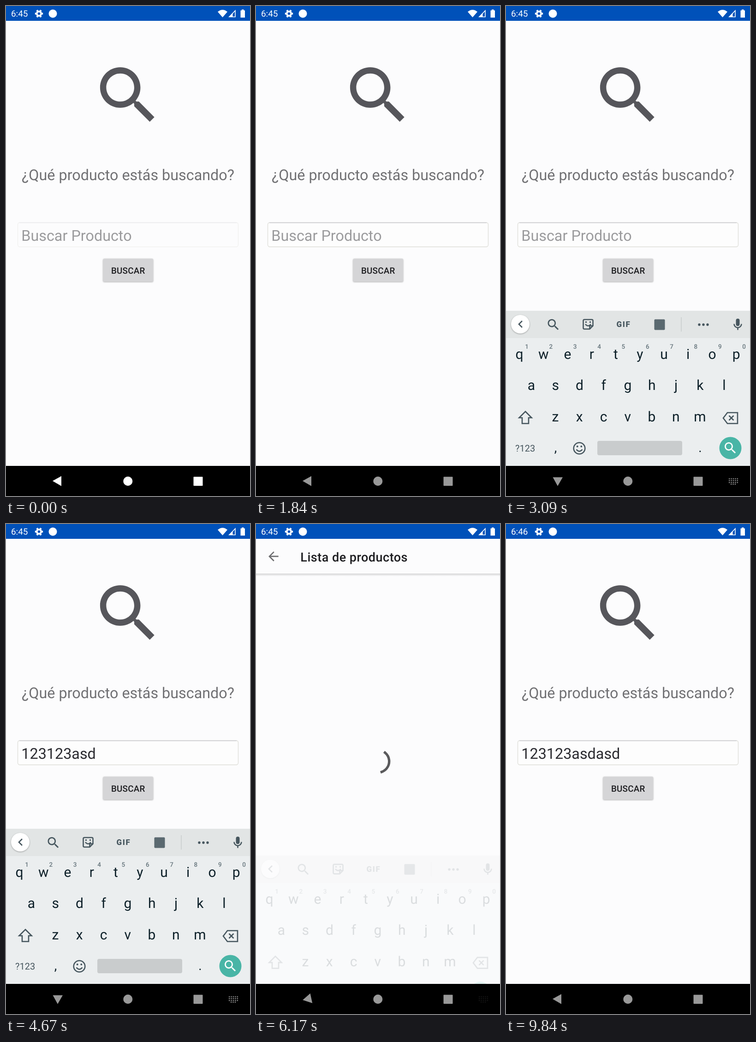
These frames come from a looping animation (529x1058 px, 9890 ms). An HTML page:

```html
<!DOCTYPE html>
<html lang="es">
<head>
<meta charset="utf-8">
<title>Buscar producto</title>
<style>
  html, body { margin: 0; width: 100%; height: 100%; overflow: hidden; background: #fcfcfd; }
  svg { display: block; width: 100%; height: 100%; }
  text { font-family: Roboto, sans-serif; text-rendering: geometricPrecision; white-space: pre; }
  .large { font-size: 32.33px; }
  .mid { text-anchor: middle; }
  .label { font-size: 18.86px; font-weight: 500; letter-spacing: .2px; fill: #1d1d20; }
  .shade { filter: drop-shadow(0 1.5px 1.5px rgba(0, 0, 0, .32)); }
  .line { fill: none; stroke: #46565e; stroke-width: 2.6; }
</style>
</head>
<body>
<svg viewBox="0 0 529 1058" preserveAspectRatio="none">
  <defs>
    <path id="lens" d="M15.5 14h-.79l-.28-.27C15.41 12.59 16 11.11 16 9.5 16 5.91 13.09 3 9.5 3S3 5.91 3 9.5 5.91 16 9.5 16c1.61 0 3.09-.59 4.23-1.57l.27.28v.79l5 4.99L20.49 19l-4.99-5zm-6 0C7.01 14 5 11.99 5 9.5S7.01 5 9.5 5 14 7.01 14 9.5 11.99 14 9.5 14z"/>
    <linearGradient id="barShadow" x2="0" y2="1">
      <stop stop-color="#000" stop-opacity=".16"/>
      <stop offset="1" stop-color="#000" stop-opacity="0"/>
    </linearGradient>
  </defs>
  <rect width="529" height="1058" fill="#fcfcfd"/>

  <g id="search">
    <use href="#lens" transform="translate(183.7 112) scale(6.735)" fill="#56565b"/>
    <text class="large mid" x="264.5" y="376" fill="#717174">¿Qué producto estás buscando?</text>
    <g id="field">
      <rect x="25.5" y="467.5" width="478" height="52.5" rx="4.5" fill="#fdfdfd" stroke="#dfdfda" stroke-width="1.4"/>
      <path d="M29 467.8H500" stroke="#cfcfd3" stroke-width="1.8"/>
    </g>
    <text id="entry" class="large" x="33.3" y="507"></text>
    <rect class="shade" x="210.5" y="545.5" width="108.5" height="49.5" rx="2.5" fill="#d5d5d7"/>
    <text class="label mid" x="264.7" y="577.5">BUSCAR</text>
  </g>

  <g id="list">
    <rect y="107" width="529" height="6" fill="url(#barShadow)"/>
    <path transform="translate(21.7 53.8) scale(1.347)" fill="#6e6e70" d="M20 11H7.83l5.59-5.59L12 4l-8 8 8 8 1.41-1.41L7.83 13H20v-2z"/>
    <text x="96.3" y="81" font-size="26.94" font-weight="500" letter-spacing=".5" fill="#1d1d20">Lista de productos</text>
    <circle id="spinner" cx="264.5" cy="512.5" r="24.2" pathLength="1" fill="none" stroke="#5a5a5c" stroke-width="5.39" stroke-linecap="square"/>
    <g id="missing">
      <g transform="translate(197.15 331.5) scale(5.612)" fill="#56565b">
        <path d="M15.5 14h-.79l-.28-.27C15.41 12.59 16 11.11 16 9.5 16 5.91 13.09 3 9.5 3 6.08 3 3.28 5.64 3.03 9h2.02C5.3 6.75 7.18 5 9.5 5 11.99 5 14 7.01 14 9.5S11.99 14 9.5 14c-.17 0-.33-.03-.5-.05v2.02c.17.02.33.03.5.03 1.61 0 3.09-.59 4.23-1.57l.27.28v.79l5 4.99L20.49 19l-4.99-5z"/>
        <path d="M1.18 11.18l5.64 5.64M6.82 11.18l-5.64 5.64" stroke="#56565b"/>
      </g>
      <text class="large mid" x="264.5" y="526" font-weight="700" fill="#717174">El producto no fue encontrado</text>
      <rect class="shade" x="132.5" y="569" width="264.5" height="49.5" rx="2.5" fill="#d5d5d7"/>
      <text class="label mid" x="264.7" y="601">REGRESAR A LA BUSQUEDA</text>
    </g>
  </g>

  <g id="keyboard">
    <rect y="658" width="529" height="335" fill="#ebeeef"/>
    <rect y="658" width="529" height="59" fill="#e2e5e5"/>
    <circle class="shade" cx="31" cy="687" r="20" fill="#fff"/>
    <path class="line" d="M35 680l-7 7 7 7"/>
    <use href="#lens" transform="translate(86.5 672) scale(1.347)" fill="#46565e"/>
    <path class="line" d="M170 677h16a2.5 2.5 0 0 1 2.5 2.5v11l-7 7H170a2.5 2.5 0 0 1-2.5-2.5v-15.500a2.500 2.500 0 0 1 2.500-2.500zM181.500 697v-6.500h6.500M172 687q6 7 12 0"/>
    <path d="M172 681h3v3h-3zM181 681h3v3h-3z" fill="#46565e"/>
    <text class="mid" x="255" y="693" font-size="17" font-weight="900" letter-spacing="1.6" fill="#46565e">GIF</text>
    <rect x="321.500" y="676.500" width="23" height="23" rx="2" fill="#5a6970"/>
    <path d="M380 672v31" stroke="#c9cdcd" stroke-width="1.500"/>
    <g fill="#46565e"><circle cx="419" cy="688" r="2.700"/><circle cx="428" cy="688" r="2.700"/><circle cx="437" cy="688" r="2.700"/></g>
    <rect x="498.500" y="675" width="8" height="16" rx="4" fill="#46565e"/>
    <path class="line" d="M494.500 686.500a8 8 0 0 0 16 0M502.500 694.500v5"/>
    <g id="keys" class="mid" font-size="30" fill="#0d2029"></g>
    <path class="line" d="M42 875.500l13.500 13.500H49v12.500H35V889h-6.500z"/>
    <path class="line" d="M480 878h22v23.500h-22l-9-11.750zM483.500 884.500l10 10M493.500 884.500l-10 10"/>
    <text x="20" y="962" font-size="20" fill="#46565e">?123</text>
    <g class="mid" font-size="28" fill="#0d2029"><text x="107.500" y="963">,</text><text x="421" y="963">.</text></g>
    <circle class="line" cx="159" cy="955" r="12.300"/>
    <path class="line" d="M152.500 957.500q6.500 8 13 0"/>
    <g fill="#46565e"><circle cx="154.700" cy="951" r="2"/><circle cx="163.300" cy="951" r="2"/></g>
    <rect x="198" y="939" width="184" height="31" rx="4" fill="#c9cccd"/>
    <circle cx="486.500" cy="954.500" r="24" fill="#49b5a6"/>
    <use href="#lens" transform="translate(470 938) scale(1.370)" fill="#fff"/>
  </g>

  <rect width="529" height="32" fill="#0051b9"/>
  <g fill="#fff">
    <text id="clock" x="11" y="23" font-size="18.860"></text>
    <g fill="none" stroke="#fff">
      <circle cx="71.500" cy="16.500" r="4.700" stroke-width="3.800"/>
      <circle cx="71.500" cy="16.500" r="7.300" stroke-width="2.800" pathLength="12" stroke-dasharray="1" stroke-dashoffset=".5"/>
    </g>
    <circle cx="101.500" cy="16.500" r="9"/>
    <path d="M459 12.500q10.500-8.500 21 0L469.500 24.500z"/>
    <path d="M497 10v13.500h-13z" fill="none" stroke="#fff" stroke-width="1.600"/>
    <path d="M482.500 24l9-9v9z"/>
    <path d="M511 7.500h4.500v2h2.500V25h-9.500V9.500h2.500z"/>
  </g>

  <rect y="993" width="529" height="65" fill="#000"/>
  <g id="nav">
    <path id="back" d="M101 1025.500L120 1015v21.500z"/>
    <circle cx="264.300" cy="1026" r="10"/>
    <rect x="406.500" y="1016.500" width="20" height="19.500" rx="1"/>
  </g>
  <path id="switcher" d="M483 1021h20M483 1025h20M483 1029h20M487 1032.500h12" stroke="#999" stroke-width="2.200" stroke-dasharray="2.400 2"/>
</svg>
<script>
const LOOP = 9890;
const KEYS_IN = 2500, KEYS_OUT = 6060, KEYS_FADE = 190;
const TYPE_START = 3400, TYPE_STEP = 130, QUERY = '123123asdasd';
const OPEN_LIST = 5930, SPIN_START = 5950, SHOW_MISSING = 6790, CLOSE_LIST = 8300;
const SPIN_CYCLE = 1333;

const $ = id => document.getElementById(id);
const clamp = x => Math.min(1, Math.max(0, x));
const show = (id, on) => { $(id).style.visibility = on ? 'visible' : 'hidden'; };

// Cubic easing (.4, 0, .2, 1), solved by bisection.
function ease(x) {
  let lo = 0, hi = 1;
  for (let i = 0; i < 24; i++) {
    const s = (lo + hi) / 2, r = 1 - s;
    if (3 * r * r * s * .4 + 3 * r * s * s * .2 + s ** 3 < x) lo = s; else hi = s;
  }
  return lo * lo * (3 - 2 * lo);
}

function buildKeys() {
  const add = (text, x, y, extra = '') =>
    `<text x="${x}" y="${y}" ${extra}>${text}</text>`;
  const rows = [['qwertyuiop', 29, 762], ['asdfghjkl', 55, 829], ['zxcvbnm', 107, 897]];
  let html = '';
  for (const [letters, x, y] of rows)
    [...letters].forEach((c, i) => { html += add(c, x + i * 52.25, y); });
  for (let i = 0; i < 10; i++)
    html += add((i + 1) % 10, 45 + i * 52.35, 740, 'font-size="13.5" font-weight="500" fill="#66757c"');
  $('keys').innerHTML = html;
}

function drawSpinner(t) {
  const p = t % SPIN_CYCLE / SPIN_CYCLE;
  const start = .75 * ease(clamp(p * 2 - 1));
  const length = Math.max(.001, .75 * ease(clamp(p * 2)) - start);
  const angle = t * 720 / 6665 + 360 * (.25 * p + start) - 90;
  $('spinner').setAttribute('stroke-dasharray', `${length} ${1 - length}`);
  $('spinner').setAttribute('transform', `rotate(${angle} 264.5 512.5)`);
}

function draw(t) {
  const inList = t >= OPEN_LIST && t < CLOSE_LIST;
  const missing = inList && t >= SHOW_MISSING;
  const spinning = inList && !missing && t >= SPIN_START;
  show('search', !inList);
  show('list', inList);
  show('missing', missing);
  show('spinner', spinning);
  if (spinning) drawSpinner(t - SPIN_START);

  const typed = QUERY.slice(0, Math.floor(Math.max(0, t - TYPE_START) / TYPE_STEP));
  $('entry').textContent = typed || 'Buscar Producto';
  $('entry').setAttribute('fill', typed ? '#2b2b30' : '#9b9b9d');
  $('field').setAttribute('opacity', t < 290 ? .35 : 1);
  $('clock').textContent = t < CLOSE_LIST ? '6:45' : '6:46';

  const up = ease(clamp((t - KEYS_IN) / KEYS_FADE)) - ease(clamp((t - KEYS_OUT) / KEYS_FADE));
  show('keyboard', up > 0);
  $('keyboard').setAttribute('opacity', up);
  $('keyboard').setAttribute('transform', `translate(0 ${(1 - up) * 67})`);
  $('back').setAttribute('transform', `rotate(${-90 * up} 112 1025.5)`);
  $('switcher').setAttribute('opacity', up);

  const gray = Math.round(255 - 102 * clamp((t - 550) / 1050));
  $('nav').setAttribute('fill', `rgb(${gray},${gray},${gray})`);
}

buildKeys();
const began = performance.now();
function tick() {
  draw((performance.now() - began) % LOOP);
  requestAnimationFrame(tick);
}
tick();
</script>
</body>
</html>
```
